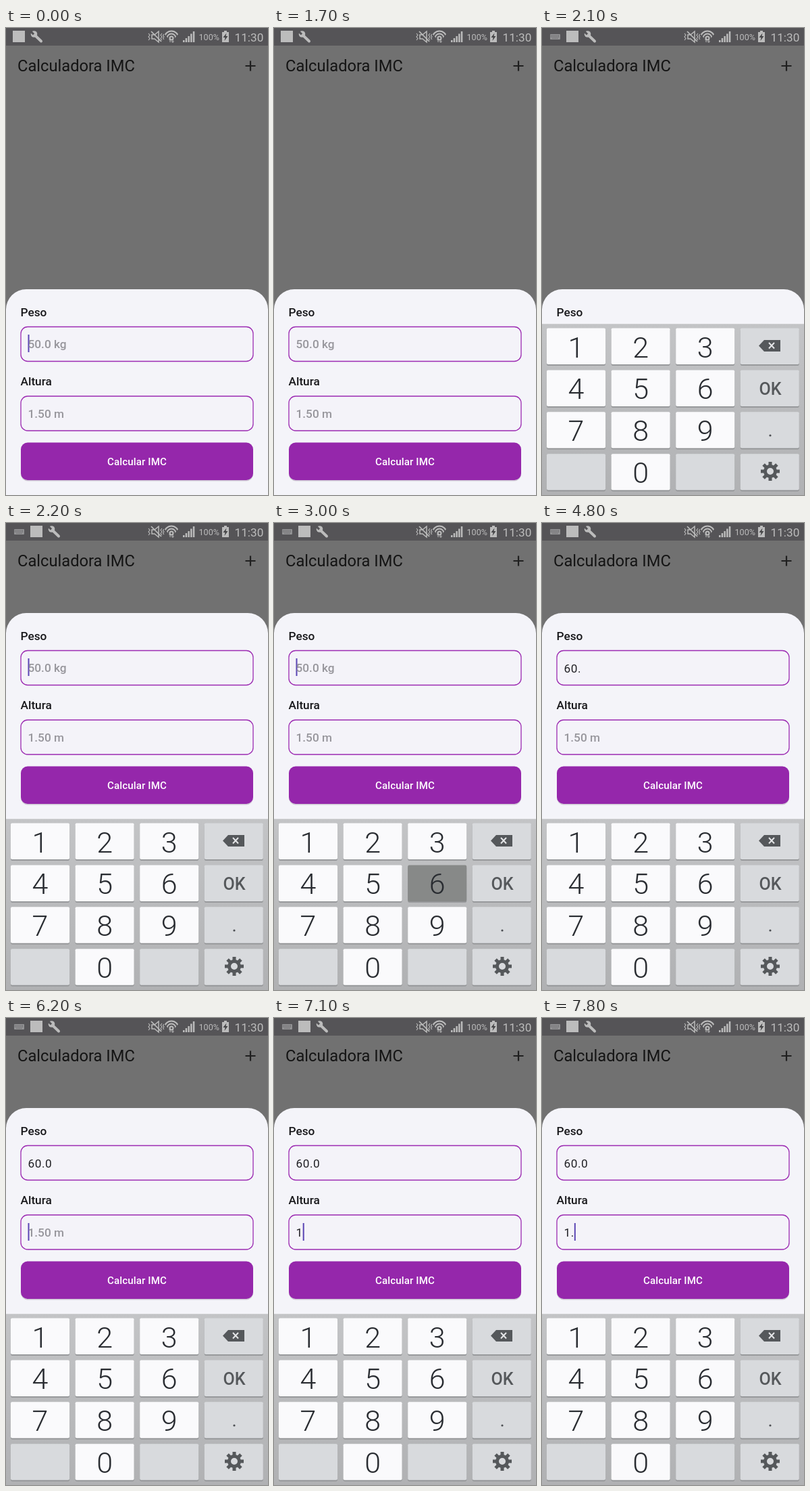
An HTML page that plays this animation: 388x690 px, repeating every 8 s.

```html
<!DOCTYPE html>
<html lang="pt">
<head>
<meta charset="utf-8">
<style>
html, body { margin: 0; width: 100%; height: 100%; overflow: hidden; background: #717171; }
svg { display: block; width: 100vw; height: 100vh; font-family: Roboto, sans-serif; }
.label { font-size: 17.24px; font-weight: 500; fill: #18181b; }
.hint { font-size: 17.24px; font-weight: 500; fill: #97969c; }
.value { font-size: 17.24px; letter-spacing: .54px; fill: #202024; }
.field { fill: #f4f3f9; stroke: #9c2bb2; stroke-width: 1.3; }
.digit { font-size: 43px; font-weight: 300; fill: #292c31; text-anchor: middle; }
.line { fill: none; stroke: #bcbcbc; }
</style>
</head>
<body>
<svg viewBox="0 0 388 690">
  <defs>
    <linearGradient id="board" x2="0" y2="1">
      <stop stop-color="#c3c4c6"/><stop offset="1" stop-color="#b0b1b3"/>
    </linearGradient>
    <clipPath id="fan"><path d="M245 21 L234 8 V2 H256 V8Z"/></clipPath>
  </defs>
  <rect width="388" height="690" fill="#717171"/>
  <rect width="388" height="26" fill="#555457"/>

  <g fill="#bcbcbc">
    <g id="imeIcon">
      <rect x="12" y="9" width="15" height="8" rx="1" fill="#929294"/>
      <path d="M13 11h13M13 13h13M15.5 15.2h8" stroke="#555457" stroke-width="1" stroke-dasharray="1 1.2"/>
    </g>
    <g id="notices">
      <rect x="10" y="4" width="18" height="17"/>
      <path d="M41 9 L52 19.500" class="line" stroke-width="4" stroke-linecap="round"/>
      <circle cx="41.500" cy="9" r="4.800"/>
      <path d="M36 4.500 L41 9.300" stroke="#555457" stroke-width="3.200"/>
    </g>
    <path d="M216 10h4l6-5v16l-6-5h-4z" class="line" stroke-width="1.500"/>
    <path d="M215 5l15 15" class="line" stroke-width="1.700"/>
    <path d="M211 8l2 2.500-2 2.500 2 2.500-2 2.500M231 8l-2 2.500 2 2.500-2 2.500 2 2.500M234 9l-1.500 2 1.500 2-1.500 2 1.500 2" class="line" stroke-width="1.100"/>
    <g clip-path="url(#fan)" class="line" stroke-width="2">
      <circle cx="245" cy="15" r="10.500"/><circle cx="245" cy="15" r="6.500"/><circle cx="245" cy="15" r="2.500"/>
    </g>
    <path d="M243 21v-5m-1.500 1.500L243 15.500l1.500 2M247 16v5m-1.500-1.500 1.500 2 1.500-2" class="line" stroke-width="1"/>
    <path d="M262 18h2.500v3H262zM265.700 15h2.500v6h-2.500zM269.400 12h2.500v9h-2.500zM273.100 8.500h2.500V21h-2.500zM276.800 5h2.500v16h-2.500z"/>
    <text x="285.500" y="18" font-size="12.600">100%</text>
    <path d="M320 6h3V4h4v2h3v15h-10z"/>
    <path d="M326.500 7.500l-5 6.500h3l-1 5 5-7h-3z" fill="#454547"/>
    <text x="338.500" y="19.500" font-size="17.200">11:30</text>
  </g>

  <text x="17" y="64" font-size="23.700" fill="#141414">Calculadora IMC</text>
  <path d="M354.500 56h15M362 48.500v15" stroke="#202020" stroke-width="2.200"/>

  <g id="sheet">
    <path d="M0 760V416a30 30 0 0 1 30-30H358a30 30 0 0 1 30 30V760z" fill="#f4f4f9"/>
    <text class="label" x="21.500" y="426">Peso</text>
    <rect class="field" x="22" y="441.500" width="344" height="51" rx="10"/>
    <text class="label" x="21.500" y="528">Altura</text>
    <rect class="field" x="22" y="544" width="344" height="51" rx="10"/>
    <rect id="caret" y="453" width="2" height="26" fill="#5a45b4"/>
    <text class="hint" id="weightHint" x="32.500" y="473">50.0 kg</text>
    <text class="value" id="weight" x="32.500" y="473.500"></text>
    <text class="hint" id="heightHint" x="32.500" y="575.500">1.50 m</text>
    <text class="value" id="height" x="32.500" y="576"></text>
    <rect x="22" y="614" width="344" height="55.500" rx="10" fill="#a99bb0" opacity=".5"/>
    <rect x="22" y="612.500" width="344" height="55.500" rx="10" fill="#9527ab"/>
    <text x="194" y="646" font-size="15.100" font-weight="500" letter-spacing=".1" fill="#fff" text-anchor="middle">Calcular IMC</text>
  </g>

  <g id="keyboard">
    <rect y="437" width="388" height="253" fill="url(#board)"/>
    <rect y="437" width="388" height="1" fill="#cfd0d2"/>
    <g id="keys"></g>
    <path d="M321 469.500l8-8.500h24v17h-24z" fill="#55585b"/>
    <path d="M336 465l8 8.500m0-8.500l-8 8.500" stroke="#e4e5e7" stroke-width="2"/>
    <text x="338" y="541.500" font-size="25" font-weight="500" fill="#55585b" text-anchor="middle">OK</text>
    <circle cx="338" cy="602" r="1.600" fill="#4c4f53"/>
    <circle cx="338" cy="655" r="7.500" fill="none" stroke="#55585b" stroke-width="5"/>
    <g id="cogs" fill="#55585b"></g>
  </g>
</svg>
<script>
const LOOP = 8000, STEP = 100, KEYBOARD_HEIGHT = 253;
const $ = id => document.getElementById(id);
const show = (id, on) => $(id).style.display = on ? '' : 'none';

const layout = ['1', '2', '3', 'del', '4', '5', '6', 'ok', '7', '8', '9', '.', '', '0', ' ', 'cog'];
$('keys').innerHTML = layout.map((key, i) => {
  const x = 7 + 95.6 * (i % 4), y = 443.5 + 61.9 * (i >> 2);
  const digit = /\d/.test(key);
  return `<rect x="${x}" y="${y + 1.8}" width="87" height="53.500" rx="2" fill="#929496"/>
    <rect id="key${i}" x="${x}" y="${y}" width="87" height="53.500" rx="2" fill="${digit ? '#fafafc' : '#d8dadd'}"/>
    ${digit ? `<text class="digit" x="${x + 43.5}" y="${y + 43}">${key}</text>` : ''}`;
}).join('');
$('cogs').innerHTML = Array.from({ length: 8 }, (_, i) =>
  `<rect x="335.500" y="641" width="5" height="6" transform="rotate(${i * 45} 338 655)"/>`).join('');

// Each entry: start time, key held down
const presses = [[3000, '6'], [3600, '0'], [4100, '.'], [4600, '0'], [6900, '1'], [7500, '.']];
const weightTyping = [[0, ''], [3300, '6'], [3800, '60'], [4300, '60.'], [4900, '60.0']];
const heightTyping = [[0, ''], [7100, '1'], [7800, '1.']];
const caretBlink = [[0, true], [300, false], [800, true], [1300, false], [1900, true], [2300, false],
  [2800, true], [4800, false], [4900, true], [5900, false], [6200, true], [6700, false],
  [7100, true], [7600, false], [7800, true]];
const at = (track, t) => track.filter(([start]) => start <= t).pop()[1];

function textWidth(text) {
  return [...text].reduce((sum, c) => sum + (c === '.' ? 5.1 : 10.2), 0);
}

function render(t) {
  const weight = at(weightTyping, t), height = at(heightTyping, t);
  $('weight').textContent = weight;
  $('height').textContent = height;
  show('weightHint', !weight);
  show('heightHint', !height);

  const onHeight = t >= 5200;
  $('caret').setAttribute('x', 32.5 + textWidth(onHeight ? height : weight));
  $('caret').setAttribute('y', onHeight ? 556 : 453);
  show('caret', at(caretBlink, t));

  const rise = Math.min(1, Math.max(0, (t - 1800) / 300));
  const hidden = KEYBOARD_HEIGHT * (1 - rise) ** 2;
  $('keyboard').setAttribute('transform', `translate(0 ${hidden})`);
  $('sheet').setAttribute('transform', `translate(0 ${t >= 2200 ? -KEYBOARD_HEIGHT : 0})`);
  show('imeIcon', t >= 1900);
  $('notices').setAttribute('transform', `translate(${t >= 1900 ? 26 : 0} 0)`);

  const pressed = presses.find(([start]) => t >= start && t < start + STEP);
  layout.forEach((key, i) => $('key' + i).style.fill = pressed && pressed[1] === key ? '#878988' : '');
}

function frame(now) {
  render(Math.floor(now % LOOP / STEP) * STEP);
  requestAnimationFrame(frame);
}
render(0);
requestAnimationFrame(frame);
</script>
</body>
</html>
```
